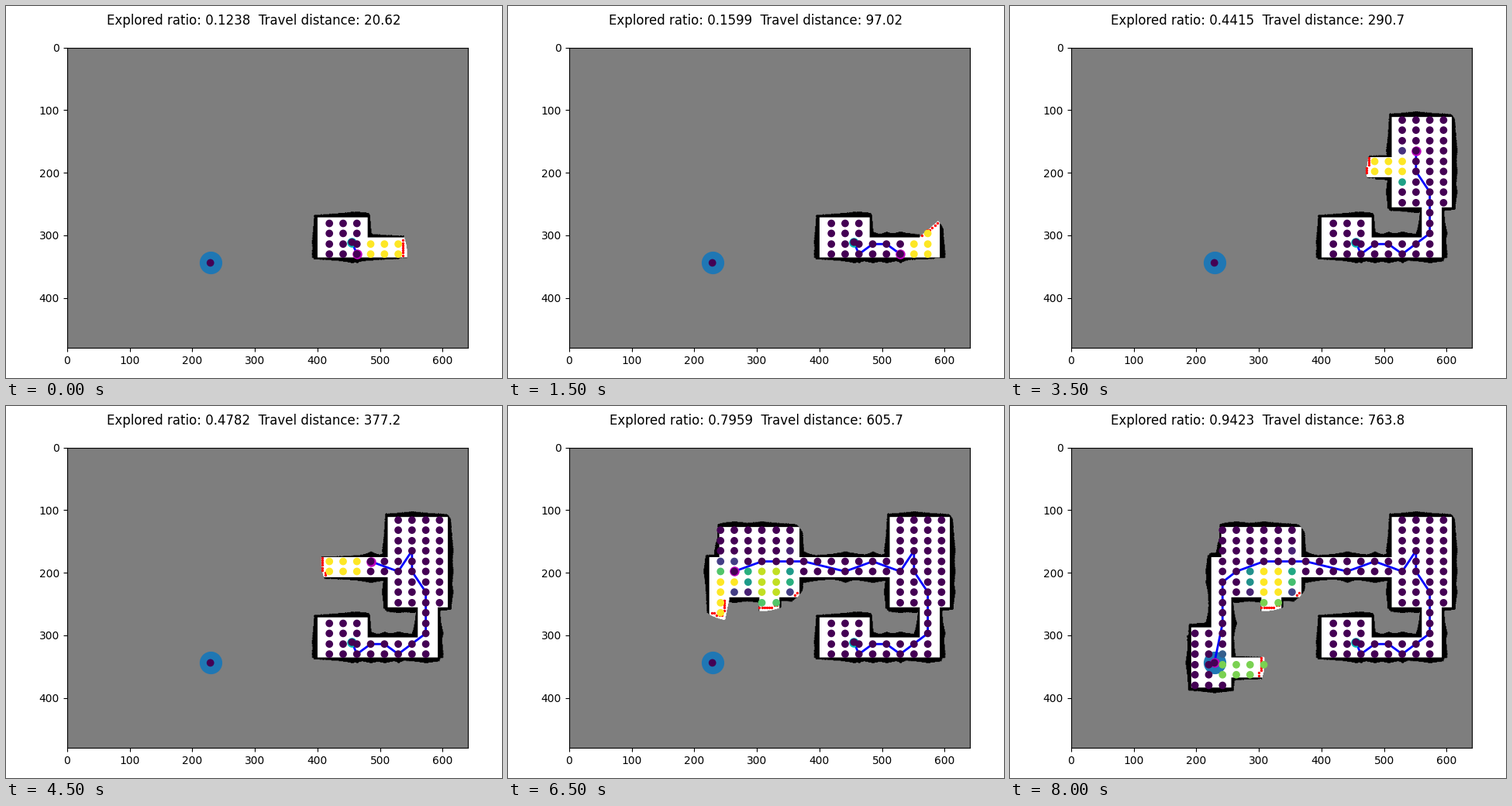
A matplotlib script that plays this animation: 640x480 px, repeating every 8.5 s.

```python
import math

import matplotlib.pyplot as plt
import numpy as np
from matplotlib.animation import FuncAnimation

W, H = 640, 480
WALL, UNKNOWN, FREE = 1, 127, 255
SENSOR_RANGE = 80
VIEW_RANGE = SENSOR_RANGE - 10
WALL_DEPTH = 10
BLOCK = 4
CELL = 16

# Rooms and corridors as x0, y0, x1, y1 in cells
ROOMS = [
    (25, 17, 30, 21), (30, 19, 37, 21), (35, 16, 37, 19), (32, 7, 38, 16),
    (23, 11, 32, 13), (15, 8, 23, 15), (14, 11, 16, 18), (12, 18, 16, 24),
    (16, 21, 21, 23), (19, 15, 21, 21),
]
# Where the robot stops, as column and row of the node grid
STOPS = [(21, 20), (22, 19), (23, 19), (24, 20), (26, 18), (26, 14),
         (25, 12), (25, 10), (24, 12), (22, 11), (20, 12), (17, 11),
         (14, 11), (12, 12), (11, 13), (11, 17)]
START, GOAL = (455, 311), (229, 344)
GRID_X = np.linspace(0, W - 1, 30).round().astype(int)
GRID_Y = np.linspace(0, H - 1, 30).round().astype(int)
ROUTE = [START] + [(int(GRID_X[i]), int(GRID_Y[j])) for i, j in STOPS] + [GOAL]
STEPS = len(ROUTE) - 1


def build_truth():
    truth = np.full((H, W), WALL, np.uint8)
    for room in ROOMS:
        x0, y0, x1, y1 = (CELL * v for v in room)
        truth[y0:y1, x0:x1] = FREE
    return truth


def walk(x0, y0, x1, y1):
    """Points from one place to another, moving along one axis at a time."""
    dx, dy = abs(x1 - x0), abs(y1 - y0)
    sx = 1 if x1 > x0 else -1
    sy = 1 if y1 > y0 else -1
    x, y, error = x0, y0, dx - dy
    dx, dy = 2 * dx, 2 * dy
    while 0 <= x < W and 0 <= y < H:
        yield x, y
        if x == x1 and y == y1:
            return
        if error > 0:
            x += sx
            error -= dy
        else:
            y += sy
            error += dx


def scan(pos, truth, belief):
    """Cast rays all round; each sees free space and a little of the wall."""
    x0, y0 = pos
    for k in range(720):
        angle = math.radians(k / 2)
        x1 = round(x0 + SENSOR_RANGE * math.cos(angle))
        y1 = round(y0 + SENSOR_RANGE * math.sin(angle))
        hits = 0
        for x, y in walk(x0, y0, x1, y1):
            seen = truth.item(y, x)
            if seen == WALL:
                hits += 1
                if hits >= WALL_DEPTH:
                    break
            elif hits:
                break
            if (x, y) == (x1, y1):
                break
            belief[y, x] = seen


def find_frontiers(belief):
    """Free blocks that touch at least two unknown blocks."""
    h, w = H // BLOCK, W // BLOCK
    small = belief.reshape(h, BLOCK, w, BLOCK).min(axis=(1, 3))
    unknown = np.pad((small == UNKNOWN).astype(int), 1)
    near = sum(unknown[i:i + h, j:j + w]
               for i in range(3) for j in range(3) if (i, j) != (1, 1))
    rows, cols = np.where((small == FREE) & (near > 1) & (near < 8))
    return np.column_stack([cols, rows]) * BLOCK


def visible(a, b, belief):
    return all(belief.item(y, x) == FREE
               for x, y in walk(*a, *b) if (x, y) != b)


def utility(node, frontiers, belief):
    """Number of frontier points in view from a node."""
    gaps = np.hypot(*(frontiers - node).T)
    return sum(visible(node, (int(x), int(y)), belief)
               for x, y in frontiers[gaps < VIEW_RANGE])


def passed(node, route):
    return any(math.dist(a, node) + math.dist(node, b) - math.dist(a, b) < 0.1
               for a, b in zip(route, route[1:]))


def explore():
    truth = build_truth()
    belief = np.full((H, W), UNKNOWN, np.uint8)
    scan(START, truth, belief)
    travel, states = 0, []
    for n in range(1, STEPS + 1):
        route = ROUTE[:n + 1]
        travel += math.dist(*route[-2:])
        scan(route[-1], truth, belief)
        frontiers = find_frontiers(belief)
        nodes = [(int(x), int(y)) for y in GRID_Y for x in GRID_X
                 if belief[y, x] == FREE] + [START, GOAL]
        values = [0 if passed(node, route) else utility(node, frontiers, belief)
                  for node in nodes]
        ratio = (belief == FREE).sum() / (truth == FREE).sum()
        states.append(dict(
            belief=belief.copy(), route=route, frontiers=frontiers,
            nodes=nodes, values=np.array(values),
            title=f"Explored ratio: {ratio:.4g}  Travel distance: {travel:.4g}"))
    return states


states = explore()

fig, ax = plt.subplots(figsize=(W / 100, H / 100), dpi=100)
title = fig.suptitle(states[0]["title"])
image = ax.imshow(states[0]["belief"], cmap="gray", vmin=WALL, vmax=FREE)
ax.set_facecolor("0.5")
ax.scatter(*GOAL, s=400)
path, = ax.plot([], [], "b", linewidth=2)
robot, = ax.plot([], [], "mo", markersize=8)
ax.plot(*START, "co", markersize=8)
frontier_dots = ax.scatter([], [], c="r", s=2, zorder=3)
node_dots = ax.scatter([0], [0], c=[0], zorder=5)
ax.axis((0, W, H, 0))
fig.tight_layout()


def update(n):
    state = states[n]
    image.set_data(state["belief"])
    xs, ys = zip(*state["route"])
    path.set_data(xs, ys)
    robot.set_data(xs[-1:], ys[-1:])
    frontier_dots.set_offsets(state["frontiers"])
    node_dots.set_offsets(state["nodes"])
    node_dots.set_array(state["values"])
    node_dots.set_clim(0, max(1, state["values"].max()))
    title.set_text(state["title"])
    return image, path, robot, frontier_dots, node_dots, title


anim = FuncAnimation(fig, update, frames=STEPS, interval=500, repeat=True,
                     repeat_delay=0)
plt.show()
```
